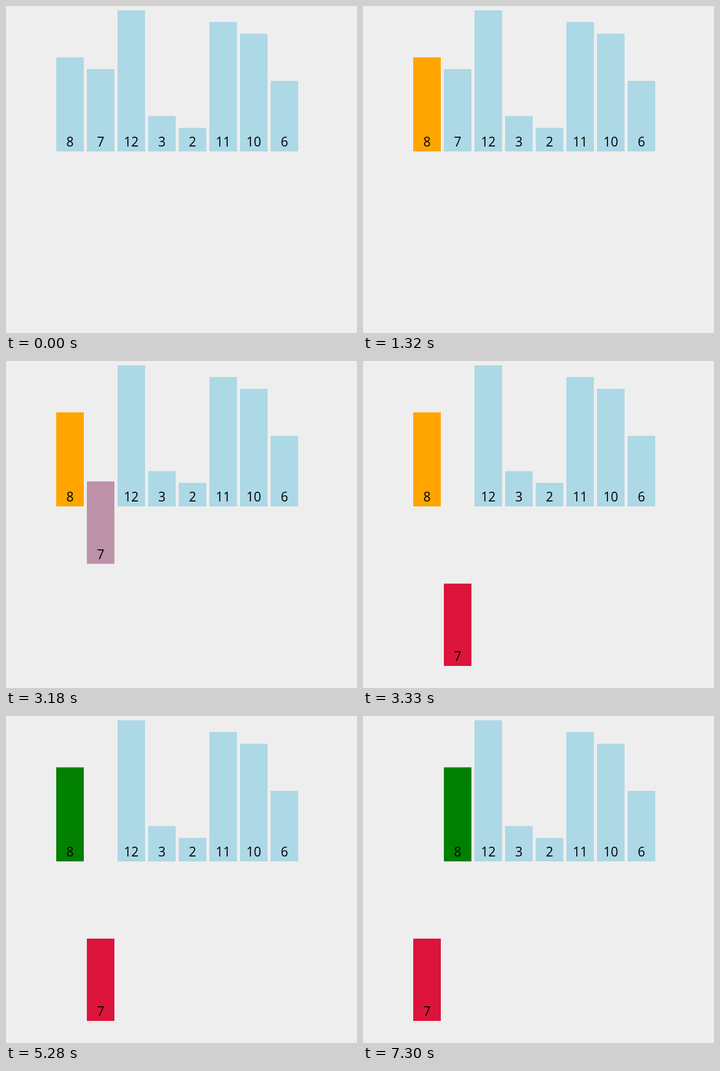
An HTML page with a canvas that plays this animation: 573x533 px, repeating every 8000 ms.

```html
<!DOCTYPE html>
<html lang="en">
<head>
<meta charset="utf-8">
<title>Insertion sort</title>
<style>
html, body { margin: 0; width: 100%; height: 100%; overflow: hidden; background: #eee; }
canvas { display: block; }
</style>
</head>
<body>
<canvas id="stage" width="573" height="533"></canvas>
<script>
const ctx = document.getElementById("stage").getContext("2d");
const LOOP = 8000, FIRST = 1076, STEP = 1992, MOVE = 250;
const SLOT = 50, DROP = 260, UNIT = 230 / 12;
const values = [8, 7, 12, 3, 2, 11, 10, 6];
const blue = [173, 216, 230], orange = [255, 165, 0], crimson = [220, 20, 60], green = [0, 128, 0];

// The picture is refreshed only at these moments and held in between.
const ticks = [0, 1160, 1240, 1320, 3090, 3180, 3250, 3330, 5200, 5280, 7070, 7140, 7220, 7300];

const mix = (a, b, p) => a.map((v, i) => Math.round(v + (b[i] - v) * p));

// Cubic in-out progress of the n-th transition
function progress(time, n) {
  const t = Math.min(1, Math.max(0, (time - FIRST - n * STEP) / MOVE));
  return t < 0.5 ? 4 * t ** 3 : 1 - 4 * (1 - t) ** 3;
}

function bar(value, slot, drop, color) {
  const x = 82 + slot * SLOT, bottom = 237 + drop, height = value * UNIT;
  ctx.fillStyle = `rgb(${color})`;
  ctx.fillRect(x, bottom - height, 45, height);
  ctx.fillStyle = "#000";
  ctx.fillText(value, x + 22.5, bottom - 8);
}

function draw(time) {
  const [mark, lift, compare, shift] = [0, 1, 2, 3].map(n => progress(time, n));
  ctx.fillStyle = "#eee";
  ctx.fillRect(0, 0, 573, 533);
  ctx.font = '21px "Open Sans", "Noto Sans", sans-serif';
  ctx.textAlign = "center";
  values.forEach((value, i) => {
    if (i === 0) bar(value, shift, 0, mix(mix(blue, orange, mark), green, compare));
    else if (i === 1) bar(value, 1 - shift, DROP * lift, mix(blue, crimson, lift));
    else bar(value, i, 0, blue);
  });
}

const start = performance.now();
function frame() {
  const time = (performance.now() - start) % LOOP;
  draw(ticks.findLast(t => t <= time));
  requestAnimationFrame(frame);
}
frame();
</script>
</body>
</html>
```
